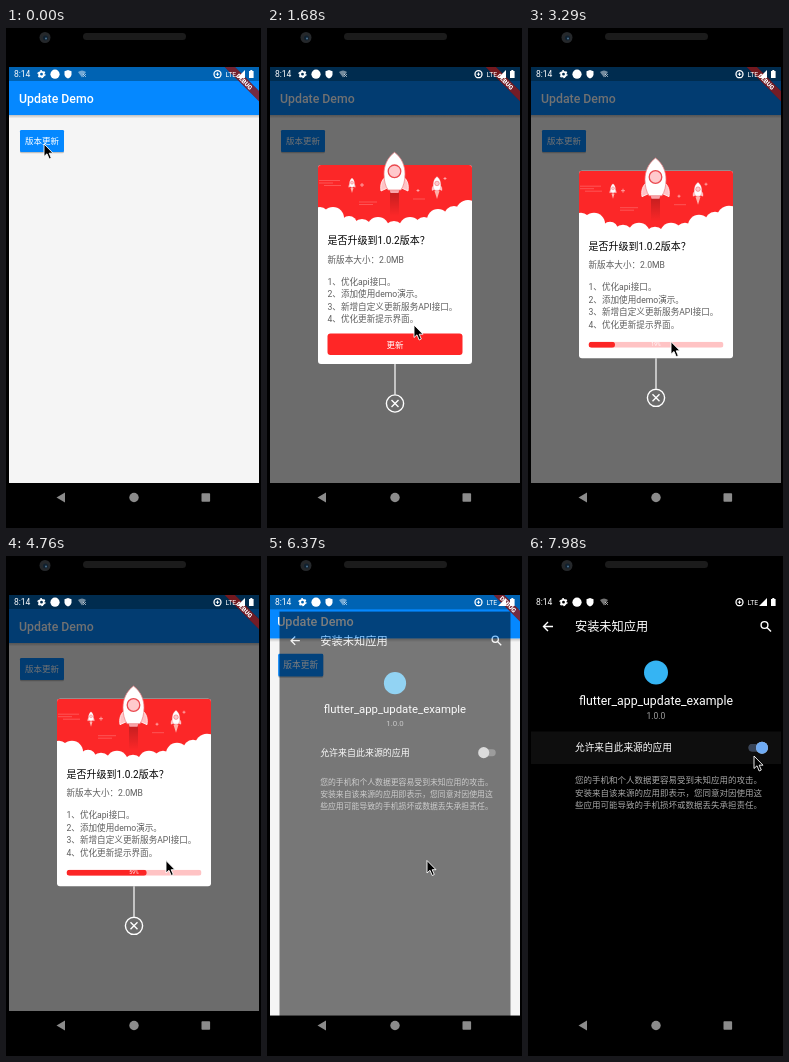
Write an HTML page that moves like this. It is 255 px wide and 500 px high and loops after 8000 ms.

```html
<!DOCTYPE html>
<html lang="zh-CN">
<head>
<meta charset="utf-8">
<title>Update Demo</title>
<style>
html, body { margin: 0; width: 100%; height: 100%; overflow: hidden; background: #000; }
svg { display: block; width: 100vw; height: 100vh; }
text { font-family: Roboto, 'Noto Sans CJK SC', 'Noto Sans CJK', sans-serif; font-size: 8.5px; white-space: pre; }
.mid { text-anchor: middle; }
.line { fill: none; stroke: #fff; stroke-width: 1.4; }
.notes text { font-size: 8.6px; }
</style>
</head>
<body>
<svg viewBox="0 0 255 500">
  <defs>
    <clipPath id="screen"><rect x="3" y="39" width="250" height="453"/></clipPath>
    <clipPath id="art"><path d="M51 203V140q0-3 3-3H202q3 0 3 3V203Z"/></clipPath>
    <clipPath id="row"><rect x="3" y="175.5" width="250" height="32.5"/></clipPath>
    <clipPath id="track"><rect x="60.5" y="308" width="135" height="6" rx="3"/></clipPath>
    <linearGradient id="shade" x2="0" y2="1"><stop stop-opacity=".22"/><stop offset="1" stop-opacity="0"/></linearGradient>
    <g id="rocket">
      <path d="M-9 25C-13 28-14.500 33-13.500 39L-7 36ZM9 25C13 28 14.500 33 13.500 39L7 36Z" fill="#ffc3c6" stroke="#fff" stroke-width=".8"/>
      <path d="M-5 37H5L4 41H-4Z" fill="#f9a5aa"/>
      <path d="M0 .3C7.500 6 10.500 14 10.500 22C10.500 29 9 34 6.500 38H-6.500C-9 34-10.500 29-10.500 22C-10.500 14-7.500 6 0 .3Z" fill="#fff" stroke="#ee7c80" stroke-width=".7"/>
      <circle cy="19.300" r="6.300" fill="#ffc9cc" stroke="#ea4a50" stroke-width="1.300"/>
    </g>
  </defs>
  <rect width="255" height="500"/>

  <!-- phone body -->
  <rect x="77" y="5" width="103" height="7" rx="3.5" fill="#1b1b1b"/>
  <circle cx="39" cy="9.5" r="5.5" fill="#25282b"/>
  <circle cx="39.5" cy="10" r="2.5" fill="#10202e"/>
  <circle cx="40" cy="10.5" r="1" fill="#4d7391"/>

  <g clip-path="url(#screen)">
    <g id="app">
      <rect x="3" y="39" width="250" height="416" fill="#f5f5f5"/>
      <rect x="3" y="87" width="250" height="3.5" fill="url(#shade)"/>
      <rect x="3" y="39" width="250" height="48" fill="#0588ff"/>
      <rect id="strip" x="3" width="250" height="14" fill="#0063b3"/>
      <text x="13" y="75.300" fill="#fff" style="font-size:12.3px;font-weight:500">Update Demo</text>
      <rect x="14" y="103" width="44" height="22.300" rx="1.500" opacity=".22"/>
      <rect x="14" y="102" width="44" height="22" rx="1.300" fill="#0588ff"/>
      <rect id="press" x="14" y="102" width="44" height="22" rx="1.300" fill="#fff"/>
      <text x="36" y="115.900" class="mid" fill="#fff">版本更新</text>

      <rect id="barrier" x="3" y="39" width="250" height="416"/>
      <g id="dialog">
        <rect id="card" x="51" width="154" rx="3" fill="#fff"/>
        <g id="upper">
          <g clip-path="url(#art)">
            <rect x="51" y="137" width="154" height="63" fill="#fc2728"/>
            <path d="M52 152.500H73M52 155H66M57 157.500H74M92 174H110M92 176.500H106M146 171H158" stroke="#fff" stroke-width=".7" opacity=".3"/>
            <path d="M95 155v4M93 157h4M151 161v3M149.500 162.500h3M178 149v3M176.500 150.500h3" stroke="#ffc6c6" stroke-width=".7"/>
            <rect x="123" y="164" width="9" height="24" fill="url(#shade)"/>
            <use href="#rocket" transform="translate(85 150) scale(.24)"/>
            <use href="#rocket" transform="translate(170 148.500) scale(.36)"/>
            <path d="M83.500 160h3l-1.500 5zM167.500 163h5l-2.500 8z" fill="#ffb0a8"/>
            <g id="clouds" fill="#fff"></g>
          </g>
          <use href="#rocket" x="127.500" y="124"/>
          <text x="60.500" y="216.200" style="font-size:10px">是否升级到1.0.2版本？</text>
          <g class="notes" fill="#5e5e5e">
            <text x="60.500" y="234.700">新版本大小：2.0MB</text>
            <text x="60.500" y="256.700">1、优化api接口。</text>
            <text x="60.500" y="269.100">2、添加使用demo演示。</text>
            <text x="60.500" y="281.500">3、新增自定义更新服务API接口。</text>
            <text x="60.500" y="293.900">4、优化更新提示界面。</text>
          </g>
          <g id="button">
            <rect x="60.500" y="305.500" width="135" height="21.500" rx="3" fill="#ff2626"/>
            <text x="128" y="319.700" class="mid" fill="#fff">更新</text>
          </g>
          <g id="progress" clip-path="url(#track)">
            <rect x="60.500" y="308" width="135" height="6" fill="#ffc3c4"/>
            <rect id="fill" x="60.500" y="308" height="6" rx="3" fill="#fc2525"/>
            <text id="percent" x="128" y="312.800" class="mid" fill="#fff" style="font-size:5px"></text>
          </g>
        </g>
        <g id="lower" class="line">
          <path d="M128 336V366.500" stroke-width="1.200"/>
          <circle cx="128" cy="375.500" r="8.600"/>
          <path d="M124.500 372l7 7m0-7l-7 7"/>
        </g>
      </g>
      <g transform="translate(253 39) rotate(45)">
        <rect x="-40" y="17" width="80" height="7.300" opacity=".5"/>
        <rect x="-40" y="17" width="80" height="7.300" fill="#b71c1c" opacity=".63"/>
        <text y="22.900" class="mid" fill="#fff" style="font-size:6.2px;font-weight:900">DEBUG</text>
      </g>
    </g>

    <g id="settings">
      <rect x="3" y="39" width="250" height="446"/>
      <path class="line" d="M25 70.500H16M20 66l-4.500 4.500l4.500 4.500"/>
      <circle class="line" cx="236.500" cy="69" r="3.400"/>
      <path class="line" d="M239 71.500l4 4"/>
      <text x="47" y="75.300" fill="#fff" style="font-size:12.2px">安装未知应用</text>
      <circle cx="128" cy="116.500" r="12" fill="#35b4f3"/>
      <text x="128" y="149" class="mid" fill="#fff" style="font-size:12.3px">flutter_app_update_example</text>
      <text x="128" y="163" class="mid" fill="#a0a0a0">1.0.0</text>
      <circle id="ripple" cx="226" cy="200" fill="#0e0e0e" clip-path="url(#row)"/>
      <text x="47" y="195.300" fill="#fff" style="font-size:9.7px">允许来自此来源的应用</text>
      <rect x="220.500" y="188" width="16.500" height="7.500" rx="3.700" fill="#484848"/>
      <rect id="trackOn" x="220.500" y="188" width="16.500" height="7.500" rx="3.700" fill="#38455a"/>
      <circle id="thumb" cy="191.700" r="6" fill="#c4c4c4"/>
      <circle id="thumbOn" cy="191.700" r="6" fill="#6fabf4"/>
      <g fill="#a6a6a6">
        <text x="47" y="226.800">您的手机和个人数据更容易受到未知应用的攻击。</text>
        <text x="47" y="239.600">安装来自该来源的应用即表示，您同意对因使用这</text>
        <text x="47" y="252.400">些应用可能导致的手机损坏或数据丢失承担责任。</text>
      </g>
    </g>

    <!-- status icons -->
    <g fill="#fff">
      <text x="8" y="49.200">8:14</text>
      <circle cx="35.500" cy="46.200" r="2.300" fill="none" stroke="#fff" stroke-width="1.800"/>
      <circle cx="35.500" cy="46.200" r="3.500" fill="none" stroke="#fff" stroke-width="1.200" stroke-dasharray="1.830"/>
      <circle cx="49" cy="46.200" r="4.600"/>
      <path d="M62 42l3.500 1.300v3q0 2.700-3.500 4.200q-3.500-1.500-3.500-4.200v-3z"/>
      <path d="M72 44q4-3 8 0l-4 5.500z" opacity=".45"/>
      <path d="M77 46l3 3m0-3l-3 3" stroke="#fff" stroke-width=".8" opacity=".7"/>
      <circle cx="211.500" cy="46.200" r="3.500" fill="none" stroke="#fff" stroke-width="1.300"/>
      <path d="M211.500 44.500v3.400M209.800 46.200h3.400" stroke="#fff"/>
      <text x="219.500" y="48.800" style="font-size:6.800px">LTE</text>
      <path d="M239 42v8h-8zM243 43h1.300v-1h2v1h1.300v7h-4.600z"/>
    </g>
  </g>

  <!-- navigation keys -->
  <g fill="#8b8b8b">
    <path d="M50.500 469.500l8.500-5v10z"/>
    <circle cx="128" cy="469.500" r="4.700"/>
    <rect x="195.500" y="465.200" width="8.600" height="8.600" rx=".8"/>
  </g>
  <path id="cursor" d="M0 0V12.500L3 9.800L5.200 15L7.300 14L5.200 9.200H9Z" stroke="#fff" stroke-width=".9"/>
</svg>
<script>
const LOOP = 8000;
const el = id => document.getElementById(id);
const set = (id, attrs) => {
  for (const name in attrs) el(id).setAttribute(name, attrs[name]);
};
const ramp = (t, from, to) => Math.min(1, Math.max(0, (t - from) / (to - from)));
const smooth = p => p * p * (3 - 2 * p);
const linear = p => p;
const easeOut = p => 1 - (1 - p) ** 3;

// Values at time t along keys of [time, ...values].
function follow(keys, t, ease) {
  let i = 0;
  while (i < keys.length - 2 && t >= keys[i + 1][0]) i++;
  const [a, b] = [keys[i], keys[i + 1]];
  const p = ease(ramp(t, a[0], b[0]));
  return a.slice(1).map((v, k) => v + (b[k + 1] - v) * p);
}

const cursorPath = [
  [0, 38, 116], [70, 38, 116], [400, 40, 121], [770, 38, 117], [1020, 38, 117],
  [1660, 147, 297], [1800, 147, 297], [2350, 145, 316], [2600, 145, 316],
  [3200, 143, 314], [3430, 143, 313], [4200, 154, 306], [4480, 160, 304.5],
  [6790, 160, 304.5], [7350, 233, 188], [7440, 233, 188], [7560, 226, 200]
];
const download = [[2660, 0], [3290, 19.6], [4760, 59.3], [5950, 100]];
const clouds = [
  [53, 188, 9], [66, 190, 11], [82, 196, 8], [95, 201, 10], [111, 200, 11], [127, 203, 10],
  [143, 200, 11], [157, 198, 9], [171, 192, 11], [187, 188, 10], [201, 184, 12]
];
el('clouds').innerHTML = clouds.map(([x, y, r]) =>
  `<circle cx="${x}" cy="${y}" r="${r}"/><rect x="${x - r}" y="${y}" width="${2 * r}" height="20"/>`).join('');

const scaleAt = (y, s) => `translate(128 ${y}) scale(${s}) translate(-128 ${-y})`;

function draw(t) {
  set('press', { opacity: .2 * ramp(t, 700, 850) * (1 - ramp(t, 950, 1150)) });

  // update dialog
  const shown = ramp(t, 980, 1160) * (1 - ramp(t, 6020, 6240));
  const loading = t >= 2660;
  const shift = loading ? 5.7 : 0;
  const [done] = follow(download, t, linear);
  set('barrier', { opacity: .555 * (1 - (1 - shown) ** 2) });
  set('dialog', { opacity: shown });
  set('card', { y: 137 + shift, height: 199 - 2 * shift });
  set('upper', { transform: `translate(0 ${shift})` });
  set('lower', { transform: `translate(0 ${-shift})` });
  set('button', { opacity: loading ? 0 : 1 });
  set('progress', { opacity: loading ? 1 : 0 });
  set('fill', { width: 1.35 * done });
  el('percent').textContent = Math.floor(done) + '%';

  // settings page opens over the app, whose status strip stays in place
  const open = easeOut(ramp(t, 6290, 6690));
  const zoom = 1 + .05 * open;
  const centre = 271;
  set('app', { transform: scaleAt(centre, zoom) });
  set('strip', { y: centre + (39 - centre) / zoom });
  set('settings', { opacity: ramp(t, 6310, 6430), transform: scaleAt(257, .85 + .15 * open) });

  // switch
  const on = smooth(ramp(t, 7700, 7900));
  const x = 224 + 10 * on;
  set('ripple', { r: 230 * ramp(t, 7640, 7920) });
  set('trackOn', { opacity: on });
  set('thumb', { cx: x });
  set('thumbOn', { cx: x, opacity: on });

  set('cursor', { transform: `translate(${follow(cursorPath, t, smooth)})` });
}

const start = performance.now();
function tick() {
  draw((performance.now() - start) % LOOP);
  requestAnimationFrame(tick);
}
tick();
</script>
</body>
</html>
```
